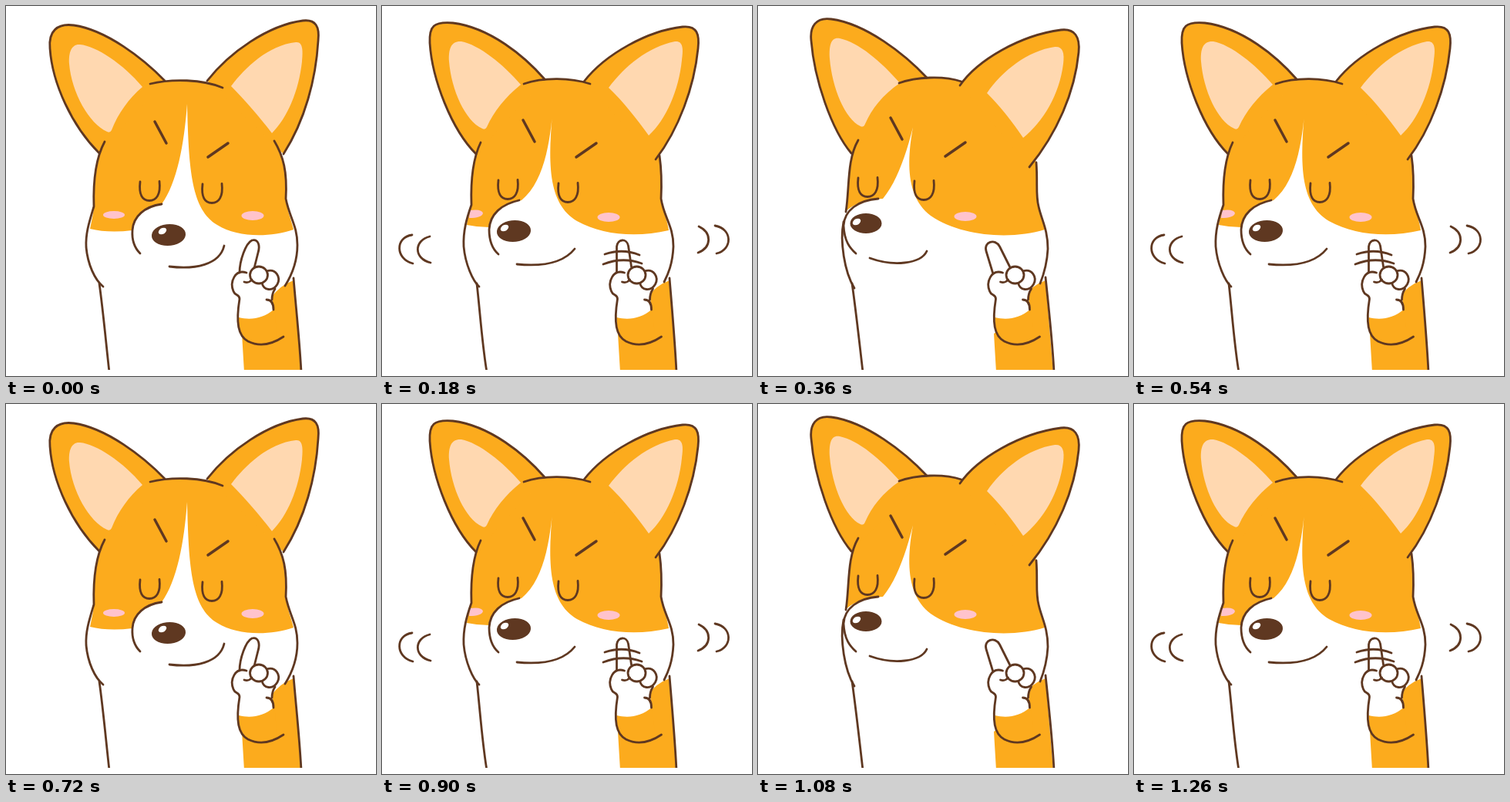
An HTML page for the animation above (1.44 s loop, 480x480 px).

```html
<!DOCTYPE html>
<html lang="en">
<head>
<meta charset="utf-8">
<title>Corgi wagging a finger</title>
<style>
  html, body { margin: 0; width: 100%; height: 100%; overflow: hidden; background: #fff; }
  svg { display: block; overflow: hidden; }
  path { fill: none; stroke-linecap: round; stroke-linejoin: round; }
  .line, .ear, .skin { stroke: #5f3821; stroke-width: 2.8; }
  .brow { stroke: #5f3821; stroke-width: 3.5; }
  .ear, .fur { fill: #fcab1d; }
  .inner { fill: #ffd8b0; }
  .blush { fill: #ffc3cc; }
  .nose { fill: #5f3821; }
  .skin, .white { fill: #fff; }
</style>
</head>
<body>
<svg id="stage" width="480" height="472"></svg>
<script>
const STEP = 180;
const SWING = [0, 1, 2, 1]; // right, middle, left, middle
const stage = document.getElementById('stage');
const parts = [];

// One path per pose; a single path serves all poses.
function part(kind, ...poses) {
  const el = document.createElementNS('http://www.w3.org/2000/svg', 'path');
  el.setAttribute('class', kind);
  stage.append(el);
  const entry = { el, poses, shift: [0, 0, 0] };
  parts.push(entry);
  return entry;
}

function moving(kind, shape, ...places) {
  part(kind, ...places.map(p => p ? `M${p}${shape}` : ''));
}

function onArm(kind, ...poses) {
  part(kind, ...poses).shift = [0, 2.5, 5.5];
}

const oval = (rx, ry, tilt = 0) =>
  `m${-rx},0a${rx},${ry} ${tilt} 1 0 ${2 * rx},0a${rx},${ry} ${tilt} 1 0 ${-2 * rx},0`;

// Body
part('fur', 'M373,356L383,475H309L306,425L348,396L344,378Q356,362 373,356Z');
part('line', 'M121,360C126,395 130,440 134,475M373,353C376,390 381,435 383,475',
  'M123,360C127,395 130,440 136,475M373,353C376,390 380,435 382,475',
  'M122,360C127,395 132,440 136,475M373,352C377,390 382,435 384,475');

// Head
part('fur',
  'M109,289C112,275 114,265 114,260C113,230 115,200 128,176C140,140 160,108 187,101C215,94 255,95 281,106C310,120 335,145 348,175C360,195 365,215 363,250C365,267 370,277 373,290C340,301 300,300 274,284C241,264 237,215 235,127C231,180 222,229 202,257C180,260 166,273 164,291Q133,295 109,289Z',
  'M110,284C111,275 115,265 116,258C115,230 117,200 128,177C140,140 160,108 184,101C210,92 245,93 270,101C310,115 345,150 360,194C363,215 363,230 362,250C365,267 370,277 372,291C330,301 285,297 253,279C215,256 214,205 223,121C219,165 214,225 181,252C157,256 141,269 139,287Q124,287 110,284Z',
  'M114,267C119,235 115,200 130,174C140,140 160,108 183,100C205,92 240,90 268,99C310,115 345,150 361,203C363,230 360,245 364,260C367,272 370,280 372,290C330,303 265,300 224,272C185,242 194,180 210,117C202,157 188,219 162,250C140,251 121,258 114,267Z');

// Ears
part('ear', 'M206,97C178,68 130,31 88,25C66,22 55,33 57,55C60,100 85,155 121,191',
  'M211,95C185,65 140,28 92,22C67,20 61,26 62,48C65,95 90,160 122,192',
  'M219,93C190,62 140,23 95,17C75,14 67,27 69,45C73,95 95,160 121,191');
part('inner',
  'M177,105C152,75 117,52 96,50C85,49 81,60 82,75C85,112 108,153 131,163Q135,165 137,161C145,140 160,119 177,105Z',
  'M180,102C157,75 125,50 103,46C90,45 86,55 87,72C90,109 108,149 130,159Q134,161 136,157C145,137 160,118 180,102Z',
  'M184,100C160,72 130,47 106,42C95,40 92,50 93,68C96,106 113,147 133,156Q137,158 139,153C147,134 162,115 184,100Z');
part('ear', 'M261,97C290,60 340,25 385,19C402,17 407,27 405,45C402,95 388,148 360,192',
  'M262,98C290,62 345,32 390,27C409,25 412,37 410,55C405,105 385,160 355,199',
  'M262,103C285,70 340,38 393,31C411,29 418,40 416,60C411,112 388,165 352,209');
part('inner',
  'M292,104C310,80 340,51 376,47C386,46 385,60 384,72C380,110 365,145 345,165C329,144 310,122 292,104Z',
  'M294,106C315,78 345,53 380,46C391,45 391,56 389,70C385,110 368,148 346,168C331,147 313,124 294,106Z',
  'M297,113C317,84 350,58 385,53C395,52 398,60 396,75C391,115 370,150 344,171C330,150 314,130 297,113Z');

// Cheeks
part('blush', 'M140,271' + oval(14, 5), 'M114,265Q130,263 131,269Q129,275 113,275Z', '');
moving('blush', oval(14.5, 6), '320,272', '294,274', '269,273');

// Head outline: crown, left side, right side
part('line',
  'M187,101C215,94 255,95 281,106M128,176C115,200 113,230 114,260C108,280 103,295 104,313C106,335 115,355 126,364M348,175C360,195 365,215 363,250C368,275 378,285 378,310C378,330 372,347 362,363',
  'M184,101C210,92 245,93 270,101M128,177C117,200 115,230 116,258C110,275 105,292 106,312C108,335 118,357 126,364M360,194C363,215 363,230 362,250C366,275 378,285 378,312C377,335 371,348 366,358',
  'M183,100C205,92 240,90 264,98M130,174C115,200 119,235 114,267M111,280C106,305 112,345 125,366M361,203C363,230 360,245 364,260C368,278 376,290 376,315C375,335 370,350 366,360');

// Face
part('line', 'M202,257C180,260 165,273 164,291C163,305 167,314 174,321',
  'M178,252C155,257 140,270 139,290C139,305 143,315 151,322',
  'M156,250C130,252 112,265 111,285C112,305 119,314 127,321');
part('line', 'M212,338C245,342 277,336 283,311', 'M175,335C205,338 234,335 250,315',
  'M145,327C175,338 211,335 219,318');
const lid = 'c-2,17 3,24.5 12,24.5s15,-8 13,-25';
moving('line', lid, '174,228', '151,226', '130,223');
moving('line', lid, '255,231', '229,230', '203,227');
moving('brow', 'l15,28', '193,150', '183,148', '172,145');
moving('brow', 'l26,-18', '262,196', '252,196', '243,195');
moving('nose', oval(22, 14, -4), '211,297', '171,292', '');
moving('nose', oval(20.5, 13), '', '', '140,282');
moving('white', oval(4.9, 3.2, -30), '203,292', '159,288', '128,280');

// Arm and hand
onArm('fur', 'M302,400L348,390L352,432Q330,443 312,434Q300,424 302,400Z');
onArm('white', 'M303,344C294,350 291,362 295,370C298,377 303,375 303,381L302,404C318,408 334,405 347,394C346,384 344,374 349,367L345,340Z');
onArm('skin', 'M303,346C303,330 311,308 319,304C327,302 330,310 327,320L322,340',
  'M302,345L302,312C303,302 315,301 317,311L321,338',
  'M299,346L290.5,318C287,306 302,301 308,312L321,338');
onArm('line', 'M312,346C297,341 290,358 295,370C297,376 303,374 303,380C298,411 301,428 314,435C330,443 345,439 360,429M349,367Q345,373 345,381M338,381Q347,381 347,394');
onArm('skin', 'M338,344C350,340 357,352 352,361C346,371 334,369 332,359');
onArm('skin', 'M328,349' + oval(11.5, 11));
onArm('line', 'M309,358Q315,360 319,355');

// Motion marks
part('line', '', 'M289,322Q312,314 334,323M287,335Q312,325 337,334', '');
part('line', '',
  'M39,297C17,300 17,328 40,334M62,299C41,304 41,328 63,333M411,286C428,294 428,313 410,320M432,285C455,289 455,316 434,321', '');

let shown = -1;
function draw() {
  const pose = SWING[Math.floor(performance.now() / STEP) % SWING.length];
  if (pose !== shown) {
    shown = pose;
    for (const { el, poses, shift } of parts) {
      el.setAttribute('d', poses.length === 1 ? poses[0] : poses[pose]);
      el.setAttribute('transform', `translate(${shift[pose]} 0)`);
    }
  }
  requestAnimationFrame(draw);
}
draw();
</script>
</body>
</html>
```
